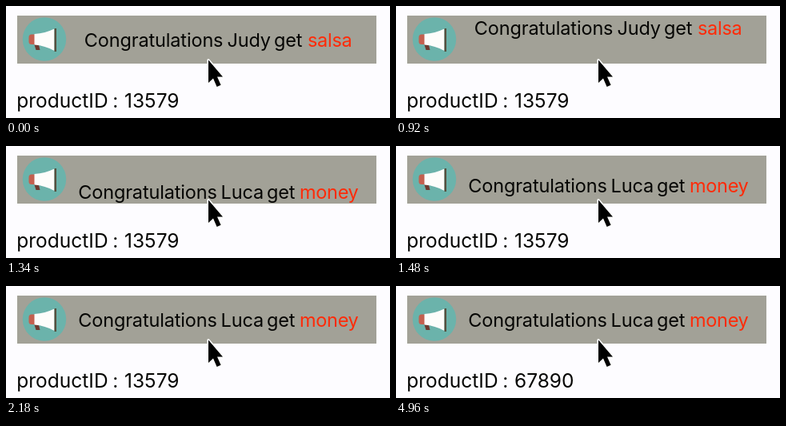
Write an HTML page that moves like this. It is 480 by 140 pixels and loops after 8 s.

```html
<!DOCTYPE html>
<html lang="en">
<head>
<meta charset="utf-8">
<title>Scrolling notice</title>
<style>
  html, body { margin: 0; width: 100%; height: 100%; overflow: hidden; background: #fdfcff; }
  svg { display: block; width: 100vw; height: 100vh; }
  text { font-family: Inter, Roboto, sans-serif; fill: #050503; white-space: pre; }
  .line { font-size: 23.5px; letter-spacing: -0.15px; }
  .product { font-size: 24.5px; }
  .prize { fill: #ff2a08; letter-spacing: -0.3px; }
</style>
</head>
<body>
<svg viewBox="0 0 480 140">
  <clipPath id="window"><rect x="14" y="12" width="449" height="60"/></clipPath>
  <rect x="14" y="12" width="449" height="60" fill="#a2a197"/>

  <g id="horn">
    <circle cx="48" cy="41.5" r="27.2" fill="#6bb3ab"/>
    <path d="M35 47h5.500l2 8h-5z" fill="#6e3a30"/>
    <path d="M36 35.500v12.500h-4q-3.500 0-3.500-3.500v-5.500q0-3.500 3.500-3.500z" fill="#c4604f"/>
    <path d="M35.500 35Q49 34 60.500 28.500V56Q49 49.500 35.500 48.500z" fill="#fdfdfb"/>
    <path d="M60.500 28h2.500v29h-2.500z" fill="#56503f"/>
  </g>

  <g clip-path="url(#window)"><g id="lines"></g></g>

  <g class="product">
    <text x="13.300" y="127">productID</text>
    <text x="133.300" y="127">:</text>
    <text id="code" x="148" y="127"></text>
  </g>

  <path d="M253 67.500V96l6-5.500 4.600 10.500 5-2.200-4.600-10.300h7z"
        fill="#000" stroke="#fff" stroke-width="3" stroke-linejoin="round" paint-order="stroke"/>
</svg>
<script>
const LOOP = 8000, ROW = 60, BASE = 50.5;
const SCROLL_AT = 490, SCROLL_MS = 1300, CODE_AT = 3140;
const lines = document.getElementById("lines");
const code = document.getElementById("code");

// Each notice is a list of [word, x]; the last word is the prize.
const notices = [
  [["Congratulations", 97.8], ["Judy", 276.5], ["get", 335], ["salsa", 377]],
  [["Congratulations", 90.2], ["Luca", 268.5], ["get", 326], ["money", 367]]
];

notices.forEach((words, row) => words.forEach(([word, x], i) => {
  const el = document.createElementNS("http://www.w3.org/2000/svg", "text");
  el.setAttribute("x", x);
  el.setAttribute("y", BASE + row * ROW);
  el.setAttribute("class", i === words.length - 1 ? "line prize" : "line");
  el.textContent = word;
  lines.append(el);
}));

// Sine ease-in-out, held at both ends.
function ease(x) {
  const p = Math.min(1, Math.max(0, x));
  return (1 - Math.cos(Math.PI * p)) / 2;
}

function draw(t) {
  const shift = -ROW * ease((t - SCROLL_AT) / SCROLL_MS);
  lines.setAttribute("transform", `translate(0 ${shift.toFixed(2)})`);
  code.textContent = t < CODE_AT ? "13579" : "67890";
}

const start = performance.now();
function tick(now) {
  draw(Math.max(0, now - start) % LOOP);
  requestAnimationFrame(tick);
}
draw(0);
requestAnimationFrame(tick);
</script>
</body>
</html>
```
